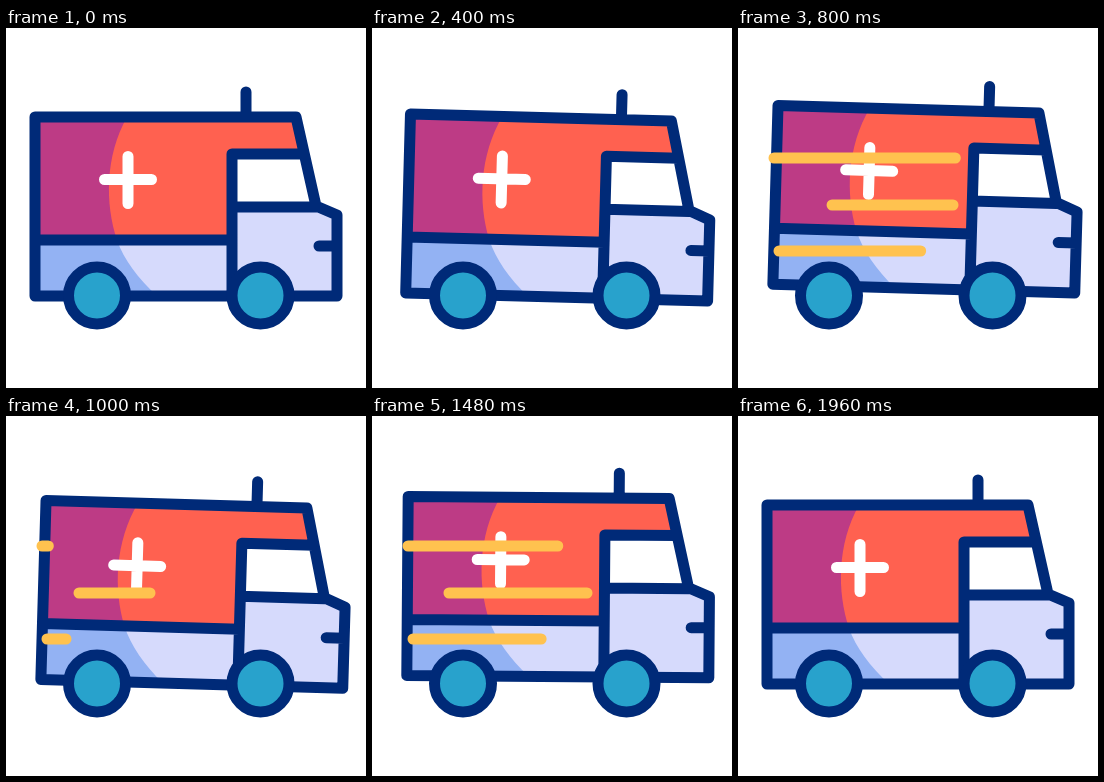
Recreate the animation shown at these times as an HTML page. Size 360 px wide and 360 px high, loop 2 s.

```html
<!DOCTYPE html>
<html lang="en">
<head>
<meta charset="utf-8">
<title>Ambulance</title>
<style>
  html, body { margin: 0; width: 100%; height: 100%; overflow: hidden; background: #fff; }
  svg { display: block; width: 100%; height: 100%; }
  .ink { fill: none; stroke: #002a78; stroke-width: 11; stroke-linecap: round; stroke-linejoin: round; }
  .cross { fill: none; stroke: #fff; stroke-width: 11; stroke-linecap: round; }
  .wheel { fill: #28a2cc; stroke: #002a78; stroke-width: 11; }
  .streak { stroke: #ffc24f; stroke-width: 11; stroke-linecap: round; }
</style>
</head>
<body>
<svg viewBox="0 0 360 360">
  <g id="van">
    <path fill="#ff6150" d="M29 89H290L299 126H226V212H29Z"/>
    <path fill="#bd3b85" d="M29 89H121C99 128 99 176 111 212H29Z"/>
    <path fill="#d6dafc" d="M29 212H226V179H310L331 187V268H29Z"/>
    <path fill="#93b2f3" d="M29 212H111C118 232 132 250 151 268H29Z"/>
    <path fill="#fff" d="M226 126H298L310 179H226Z"/>
    <path class="cross" d="M98.5 151.5H145.5M122 128.5V175.5"/>
    <path class="ink" d="M29 89H290L310 178L331 187V268H29ZM29 212H226M298 126H226V268M226 179H310M313 218H331M240 64V89"/>
  </g>
  <circle class="wheel" cx="91" cy="267.5" r="28.5"/>
  <circle class="wheel" cx="254.5" cy="267.5" r="28.5"/>
  <line class="streak" data-start="478" x1="234" x2="36" y1="130" y2="130"/>
  <line class="streak" data-start="588" x1="215" x2="73" y1="177" y2="177"/>
  <line class="streak" data-start="512" x1="184" x2="41" y1="223" y2="223"/>
</svg>
<script>
const LOOP = 2000, STEP = 40;
const REPEAT = 640, RUNS = 2, SWEEP = 280, LAG = 272;

const van = document.getElementById('van');
const streaks = [...document.querySelectorAll('.streak')].map(el => ({
  el,
  start: +el.dataset.start,
  right: +el.getAttribute('x1'),
  left: +el.getAttribute('x2')
}));

// Smooth 0 to 1 between two times
function ramp(t, from, to) {
  const u = Math.min(1, Math.max(0, (t - from) / (to - from)));
  return u * u * (3 - 2 * u);
}

// Smooth 0 to 1 and back to 0
function bump(t, from, length) {
  const u = (t - from) / length;
  return u > 0 && u < 1 ? Math.sin(Math.PI * u) ** 2 : 0;
}

function drawVan(t) {
  const x = 5.8 * (ramp(t, 0, 560) - ramp(t, 1500, 1960));
  const y = 2.2 * bump(t, 0, 520) - 7.6 * (bump(t, 520, 500) + bump(t, 1260, 500));
  const tilt = 1.65 * ramp(t, 0, 480) - 3 * ramp(t, 1280, 1740) + 1.35 * ramp(t, 1740, 1960);
  van.setAttribute('transform', `translate(${x} ${y}) rotate(${tilt} 180 268)`);
}

// The left end runs out first, the right end follows
function drawStreak({ el, start, right, left }, t) {
  const run = Math.floor((t - start) / REPEAT);
  const age = t - start - run * REPEAT;
  const on = run >= 0 && run < RUNS && age > 0 && age < LAG + SWEEP;
  const at = begin => right + (left - right) * ramp(age, begin, begin + SWEEP);
  el.setAttribute('visibility', on ? 'visible' : 'hidden');
  el.setAttribute('x1', at(LAG));
  el.setAttribute('x2', at(0));
}

function draw(t) {
  drawVan(t);
  streaks.forEach(streak => drawStreak(streak, t));
}

const origin = performance.now();
function tick() {
  const t = (performance.now() - origin) % LOOP;
  draw(Math.floor(t / STEP) * STEP);
  requestAnimationFrame(tick);
}
draw(0);
requestAnimationFrame(tick);
</script>
</body>
</html>
```
